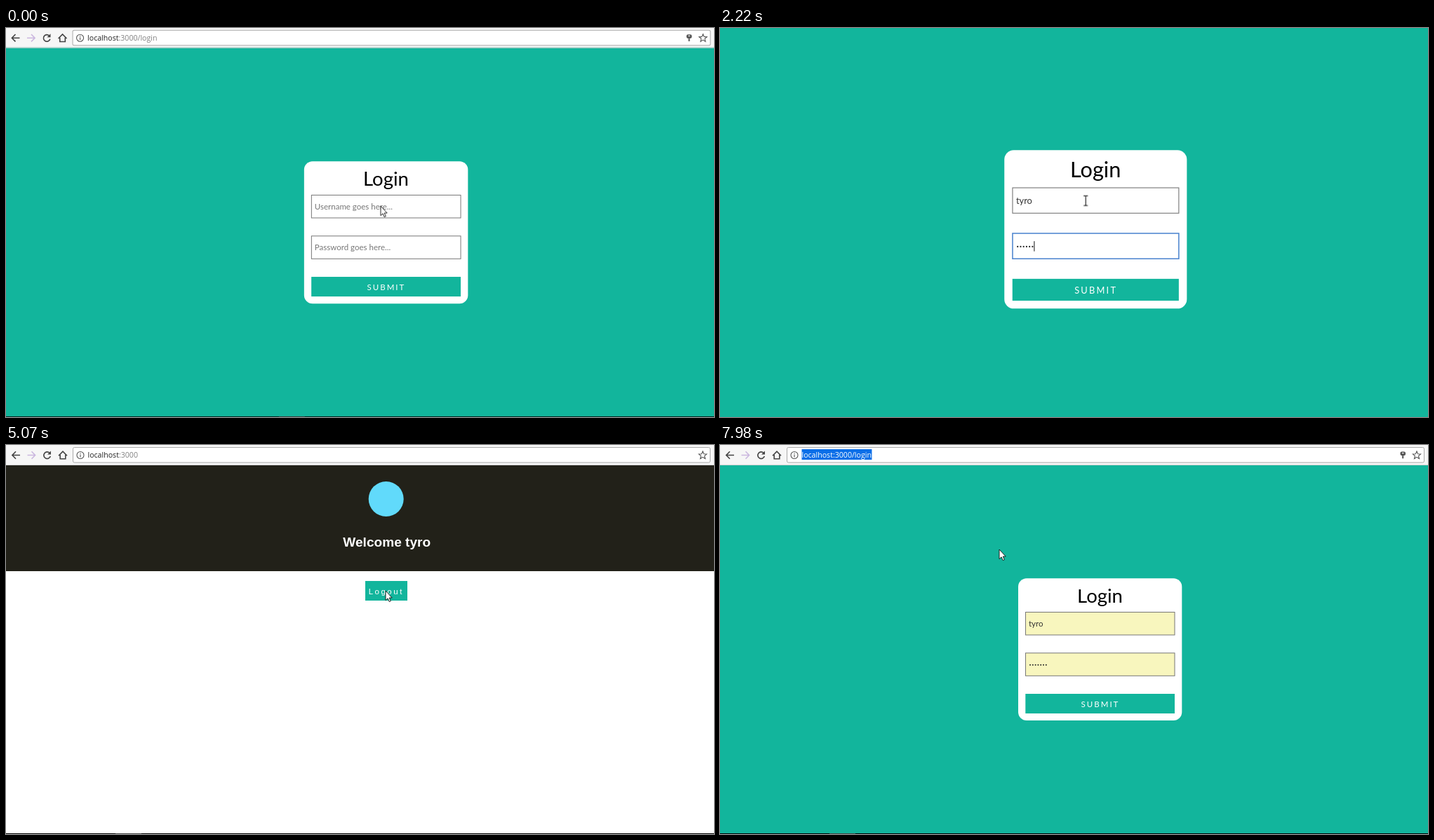
Animation of 1009x555 px, one loop 8000 ms. Source, as an HTML page:

```html
<!DOCTYPE html>
<html lang="en">
<head>
<meta charset="utf-8">
<title>Login demo</title>
<style>
  html, body { margin: 0; width: 100%; height: 100%; overflow: hidden; background: #12b59c; }
  svg { display: block; width: 1009px; height: 555px; }
  text { white-space: pre; }
  .ui { font: 10.6px "Open Sans", "Noto Sans", sans-serif; }
  .form { font: 11.5px Lato, sans-serif; }
  .line { fill: none; stroke: #444; stroke-width: 1.6; }
  .thin { fill: none; stroke: #555; stroke-width: 1.1; }
  .field { fill: #fff; stroke: #777; stroke-width: 1; }
  .field.filled { fill: #f8f6be; }
  .field.focus { stroke: #4f86d0; stroke-width: 1.4; }
  .bold { font-weight: 700; }
  .link { fill: #1f56c6; }
  .note { fill: #858585; }
  .center { text-anchor: middle; }

  #scene { transform-origin: 597px 330px; animation: zoom 8s linear infinite; }
  #cursor { animation: travel 8s linear infinite; }
  @keyframes zoom {
    0% { transform: scale(1); }
    9.9%, 18.3% { transform: scale(1.7); }
    29.62%, 100% { transform: scale(1); }
  }
  @keyframes travel {
    0% { transform: translate(534px, 254px); }
    1.3%, 32.5% { transform: translate(529px, 255px); }
    38% { transform: translate(330px, 155px); }
    39%, 39.5% { transform: translate(235px, -15px); }
    42%, 57% { transform: translate(235.5px, 21.5px); }
    62%, 64% { transform: translate(541px, 208px); }
    66.4% { transform: translate(508px, 268px); }
    71%, 98.6% { transform: translate(337.5px, 14px); }
    99.7%, 100% { transform: translate(398px, 149px); }
  }
</style>
</head>
<body>
<svg viewBox="0 0 1009 555">
  <g id="scene">
    <g id="login">
      <rect y="29" width="1009" height="526" fill="#12b59c"/>
      <rect x="425" y="190.3" width="233.3" height="202.8" rx="12" fill="#fff"/>
      <text x="541.5" y="225" class="center" style="font: 27.5px Lato, sans-serif">Login</text>
      <rect id="nameBox" class="field" x="435.5" y="238.5" width="212.5" height="32.5"/>
      <rect id="passBox" class="field" x="435.5" y="296.8" width="212.5" height="32.5"/>
      <text id="name" class="form" x="440" y="258.8"></text>
      <text id="passHint" class="form" x="440" y="317.5" fill="#777">Password goes here...</text>
      <path id="dots" stroke="#222" stroke-width="2" stroke-linecap="round" stroke-dasharray="0 3.8"/>
      <rect id="caret" width="0.9" height="13" fill="#111"/>
      <rect x="435.3" y="355" width="212.7" height="28" fill="#12b59c"/>
      <text x="542" y="373.8" class="form center" fill="#fff" letter-spacing="2">SUBMIT</text>
    </g>

    <g id="home">
      <rect y="29" width="1009" height="526" fill="#fff"/>
      <rect y="29" width="1009" height="151" fill="#222119"/>
      <circle cx="541.7" cy="77" r="25" fill="#61dafb"/>
      <text x="480.3" y="145" fill="#fff"
        style="font: bold 19.1px 'Liberation Sans', Arial, sans-serif">Welcome tyro</text>
      <rect x="512" y="194" width="60" height="28" fill="#12b59c"/>
      <text x="516.7" y="212.8" fill="#fff" letter-spacing="2.5"
        style="font: 11.5px 'Liberation Sans', Arial, sans-serif">Logout</text>
    </g>

    <rect id="blank" y="29" width="1009" height="526" fill="#fff"/>

    <g id="status">
      <path d="M-1 554.5V537.5H356.5a3 3 0 0 1 3 3V554.5z" fill="#f6f6f6" stroke="#d5d5d5"/>
      <text x="2" y="549.5" class="ui" fill="#555" style="font-size: 9.2px">Connecting...</text>
    </g>
    <rect y="554" width="1009" height="1"/>
    <rect id="task" y="554" width="37" height="1" fill="#444"/>

    <g id="chrome">
      <rect width="1009" height="28" fill="#f6f6f6"/>
      <rect y="28" width="1009" height="1" fill="#d0d0d0"/>
      <path class="line" d="M20 14.5H9.2M14 9.3L8.9 14.5L14 19.7"/>
      <path class="line" d="M30.5 14.5H41.3M36.5 9.3L41.6 14.5L36.5 19.7" style="stroke: #cbb7df"/>
      <g id="reload">
        <path class="line" d="M62 11.2A4.8 4.8 0 1 0 63.3 16"/>
        <path d="M64 8.6V13.6H59z" fill="#444"/>
      </g>
      <path id="stop" class="line" d="M54.2 10L63.2 19M63.2 10L54.2 19"/>
      <path class="line" d="M75 15.3L81 9.2L87 15.3M77.2 14V19.8H84.8V14"/>
      <rect x="95.5" y="3.5" width="908" height="21.5" rx="2" fill="#fff" stroke="#a9a9a9"/>
      <g id="info">
        <circle class="thin" cx="106" cy="14.5" r="5"/>
        <path class="thin" d="M106 13.6V17.4M106 11.3V12.5"/>
      </g>
      <path id="page" class="thin" d="M103 9.8H106.8L109.3 12.3V19H103zM106.5 10V12.6H109"/>
      <rect id="mark" x="116.5" y="6" height="15" fill="#0b6fe8"/>
      <text id="url" class="ui" x="116.5" y="18.2"><tspan id="host">localhost</tspan><tspan id="path"></tspan></text>
      <rect id="urlCaret" y="7" width="1" height="14" fill="#222"/>
      <g id="key">
        <rect x="969.5" y="9.5" width="7.5" height="5.6" rx="2" fill="#555"/>
        <rect x="972" y="11" width="2.5" height="1.2" fill="#fff"/>
        <path d="M973.2 14.5V19.2" stroke="#555" stroke-width="2"/>
      </g>
      <path id="star" class="thin" d="M993 9l1.6 3.7 4 .3-3.1 2.6 1 3.9-3.5-2.1-3.5 2.1 1-3.9-3.1-2.6 4-.3z"/>
    </g>

    <g id="menu" class="ui">
      <rect y="28" width="1009" height="126" fill="#fff"/>
      <rect x="95" y="32.7" width="909" height="19" rx="1.5" fill="#0b6fe8"/>
    </g>

    <g id="cursor">
      <path id="arrow" d="M0 0V13.6L3.1 10.8 5.2 15.6 7.3 14.7 5.3 10H9.2z" fill="#fff" stroke="#111" stroke-width="0.9"/>
      <path id="beam" d="M-2.7-6.2h2l.7.6.7-.6h2M0-6V6M-2.7 6.2h2l.7-.6.7.6h2" fill="none" stroke="#111"/>
    </g>
  </g>
</svg>
<script>
const LOOP = 8000;
const HOST = 'localhost';
const $ = id => document.getElementById(id);
const show = (id, on) => { $(id).style.display = on ? '' : 'none'; };
const within = (t, from, to) => t >= from && t < to;

// Value of the last [time, value] step that has been reached.
const at = (t, steps) => steps.reduce((v, [time, next]) => t >= time ? next : v, steps[0][1]);
const keys = (from, gap, values) => values.map((v, i) => [from + i * gap, v]);

const pages = [[0, 'login'], [2470, 'home'], [4370, 'blank'], [4530, 'home'], [5150, 'login']];
const paths = [
  [0, ':3000/login'], [2470, ':3000'], [5150, ':3000/login'],
  ...keys(6320, 54, ['logi', 'log', 'lo', 'l', ''].map(s => ':3000/' + s)),
  [6590, ':3000'], [7010, ':3000/login']
];
const names = [[0, ''], ...keys(150, 100, ['t', 'ty', 'tyr', 'tyro'])];
const dotCounts = [[0, 0], ...keys(1440, 142, [1, 2, 3, 4, 5, 6, 7])];
const selection = [[0, false], [3500, true], [3880, false], [5800, true], [6120, false], [7460, true]];
const pointers = [
  [0, 'arrow'], [60, 'beam'], [2470, 'arrow'], [3200, 'beam'],
  [4600, 'arrow'], [5640, 'beam'], [7900, 'arrow']
];

const LOGIN_URL = HOST + ':3000/login';
const suggestions = [
  { full: '', note: '' },
  { full: LOGIN_URL, note: ' - React App' },
  { full: LOGIN_URL + '?username=guest47&password=123', note: ' - React App' },
  { full: LOGIN_URL + '?msg=verify your email and than login', note: ' - Login | OltDrift' },
  { search: true, note: ' - Morvle Search' },
  { full: LOGIN_URL + '?next=/protected', note: '' }
];

function add(parent, tag, attrs) {
  const el = document.createElementNS('http://www.w3.org/2000/svg', tag);
  for (const k in attrs) el.setAttribute(k, attrs[k]);
  return parent.appendChild(el);
}

suggestions.forEach((row, i) => {
  const y = 42.6 + i * 19.85;
  const icon = row.search
    ? `M108 ${y}a3 3 0 1 0 -6 0a3 3 0 1 0 6 0M107 ${y + 1.6}l3.6 3.2`
    : `M103 ${y - 5}h3.8l2.5 2.5v6.3h-6.3zM106.5 ${y - 5}v2.6h2.6`;
  add($('menu'), 'path', { d: icon, class: 'thin', style: i ? '' : 'stroke: #fff' });
  const text = add($('menu'), 'text', { x: 116.5, y: y + 4.2 });
  row.head = add(text, 'tspan', row.search ? { fill: '#222' } : { class: 'bold', fill: i ? '#1f56c6' : '#fff' });
  row.tail = add(text, 'tspan', { class: 'link' });
  add(text, 'tspan', { class: 'note' }).textContent = row.note;
});

function drawForm(t) {
  const filled = within(t, 5200, 7010) || t >= 7100;
  const typing = t < 2470;
  const name = filled ? 'tyro' : typing ? at(t, names) : '';
  const dots = filled ? 7 : typing ? at(t, dotCounts) : 0;
  const onName = within(t, 90, 1250);
  const onPass = within(t, 1250, 2470);

  $('name').textContent = name || 'Username goes here...';
  $('name').setAttribute('fill', name ? '#333' : '#777');
  show('passHint', !dots);
  show('dots', dots);
  $('dots').setAttribute('d', `M442 313.8h${Math.max(0, dots - 1) * 3.8 + 0.1}`);
  for (const [id, focus] of [['nameBox', onName], ['passBox', onPass]]) {
    $(id).classList.toggle('filled', filled);
    $(id).classList.toggle('focus', focus);
  }
  show('caret', (onName && t < 950) || onPass);
  const nameEnd = name ? $('name').getComputedTextLength() : 0;
  $('caret').setAttribute('x', 440 + (onName ? nameEnd : dots * 3.8));
  $('caret').setAttribute('y', onName ? 248.3 : 306.8);
}

function drawChrome(t) {
  const path = at(t, paths);
  const selected = at(t, selection);
  const editing = within(t, 6320, 6750);
  const loading = within(t, 3880, 4530) || within(t, 6780, 7130);

  $('path').textContent = path;
  $('host').setAttribute('fill', selected ? '#fff' : '#222');
  $('path').setAttribute('fill', selected ? '#fff' : '#808080');
  const width = $('url').getComputedTextLength();
  show('mark', selected);
  $('mark').setAttribute('width', width + 0.5);
  show('urlCaret', within(t, 6120, 6750));
  $('urlCaret').setAttribute('x', 116.5 + width);

  show('reload', !loading);
  show('stop', loading);
  show('status', within(t, 3880, 4370));
  show('info', !editing);
  show('page', editing);
  show('star', !editing);
  show('key', t < 3880 || within(t, 5200, 6750) || t >= 7130);
  $('key').setAttribute('transform', `translate(${editing ? 20 : 0})`);

  show('menu', editing);
  const typed = HOST + path;
  for (const row of suggestions) {
    row.head.textContent = typed;
    row.tail.textContent = row.full ? row.full.slice(typed.length) : '';
  }
}

function draw(t) {
  const page = at(t, pages);
  for (const id of ['login', 'home', 'blank']) show(id, id === page);
  if (page === 'login') drawForm(t);
  drawChrome(t);
  const pointer = at(t, pointers);
  show('arrow', pointer === 'arrow');
  show('beam', pointer === 'beam');
  $('task').setAttribute('x', t < 2470 ? 389 : 156);
}

let start;
function tick(now) {
  start ??= now;
  draw((now - start) % LOOP);
  requestAnimationFrame(tick);
}
draw(0);
requestAnimationFrame(tick);
</script>
</body>
</html>
```
